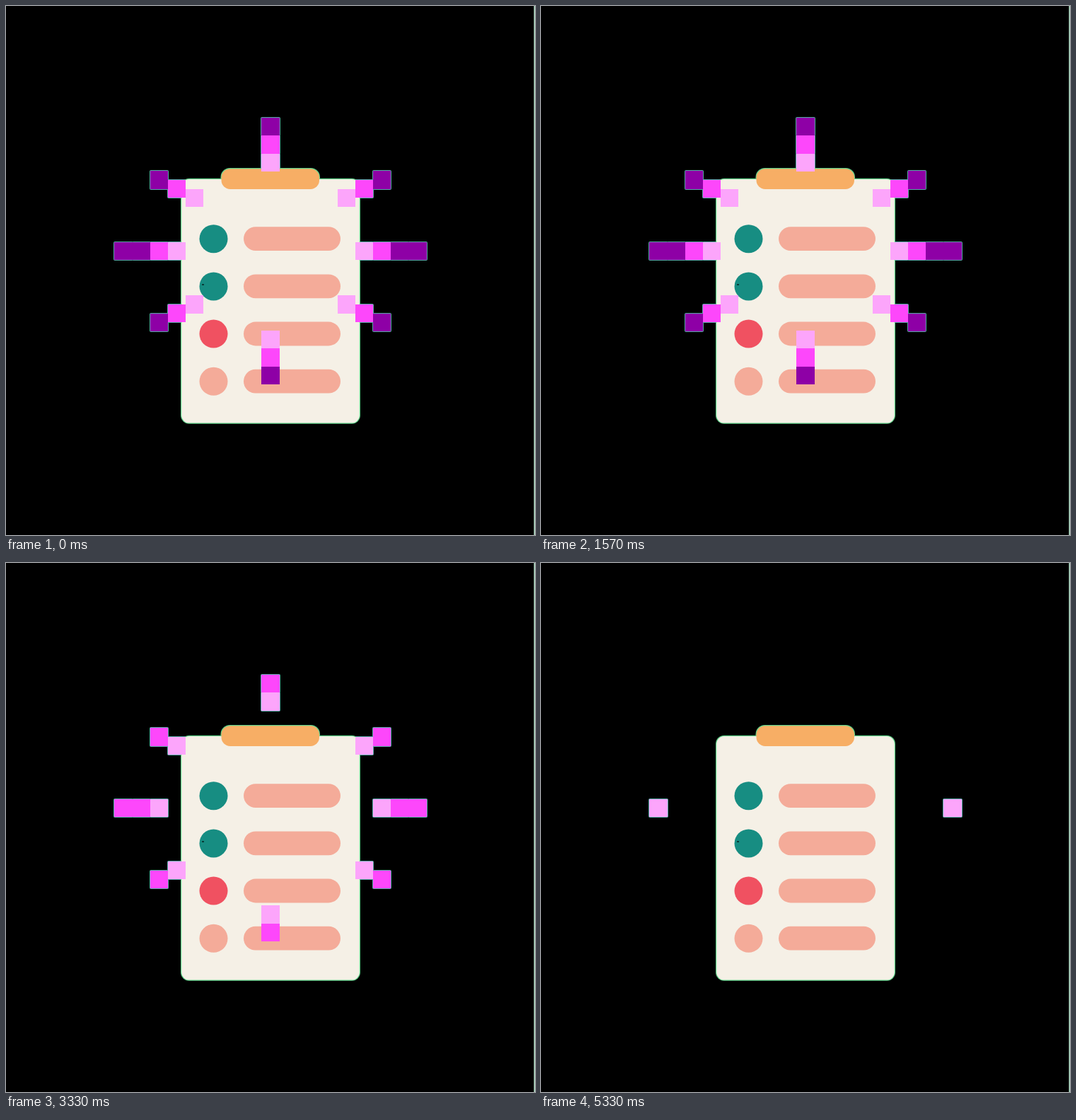
Recreate the animation shown at these times as an HTML page with a canvas. Size 748 px wide and 748 px high, loop 5360 ms.

```html
<!DOCTYPE html>
<html lang="en">
<head>
<meta charset="utf-8">
<title>Checklist burst</title>
<style>
  html, body { margin: 0; width: 100%; height: 100%; overflow: hidden; background: #000; }
  canvas { display: block; width: 748px; height: 748px; }
</style>
</head>
<body>
<canvas id="stage" width="748" height="748"></canvas>
<script>
const ctx = document.getElementById('stage').getContext('2d');

const LOOP = 5360;
const BURSTS = 7;
const CX = 374, CY = 346.5, CELL = 25.2;
const PURPLE = '#8e00a6', PINK = '#fd47fb', PALE = '#fca5fb';
const MINT = '#62d48c', RIM = '#55aaa4';

// Colours of each ray from the tip inwards, for the three stages of a burst.
const STAGES = [
  { side: [PURPLE, PURPLE, PINK, PALE], short: [PURPLE, PINK, PALE] },
  { side: [PINK, PINK, PALE], short: [PINK, PALE] },
  { side: [PALE], short: [] }
];

// Tip offset from the centre and inward step, in pixels.
const RAYS = [];
for (const s of [-1, 1]) {
  RAYS.push({ kind: 'side', x: s * 208, y: 0, dx: -s * CELL, dy: 0 });
  RAYS.push({ kind: 'short', x: 0, y: s * 175.7, dx: 0, dy: -s * CELL });
  for (const v of [-1, 1]) {
    RAYS.push({ kind: 'short', x: s * 157.8, y: v * 100.6, dx: -s * CELL, dy: -v * CELL / 2 });
  }
}

function pill(x, y, w, h, r, color) {
  ctx.fillStyle = color;
  ctx.beginPath();
  ctx.roundRect(x, y, w, h, r);
  ctx.fill();
}

function disc(x, y, r, color) {
  ctx.fillStyle = color;
  ctx.beginPath();
  ctx.arc(x, y, r, 0, Math.PI * 2);
  ctx.fill();
}

function eachCell(stage, paint) {
  for (const ray of RAYS) {
    stage[ray.kind].forEach((color, i) => {
      const left = CX + ray.x + ray.dx * i - CELL / 2;
      const top = CY + ray.y + ray.dy * i - CELL / 2;
      const x = Math.round(left), y = Math.round(top);
      paint(x, y, Math.round(left + CELL) - x, Math.round(top + CELL) - y, color);
    });
  }
}

function drawBoard() {
  pill(303.5, 229, 140.5, 30, 13, MINT);
  pill(247, 243.8, 254, 347, 12, MINT);
  pill(248.2, 245, 251.6, 344.6, 11, '#f5f0e6');
  pill(304.5, 230.2, 138.5, 28.8, 12.5, '#f7ae65');
  ['#178d82', '#178d82', '#f05161', '#f4ab99'].forEach((color, i) => {
    const y = 329.2 + i * 67.2;
    disc(293.5, y, 20, color);
    pill(336, y - 17, 137, 33.8, 16.9, '#f4ab99');
  });
  ctx.fillStyle = '#083c38';
  ctx.fillRect(277, 393, 3, 2);
}

function draw(t) {
  const phase = (t % LOOP) * BURSTS / LOOP % 1;
  const stage = STAGES[Math.floor(phase * STAGES.length)];
  ctx.fillStyle = '#000';
  ctx.fillRect(0, 0, 748, 748);
  ctx.fillStyle = '#b9e6cf';
  ctx.fillRect(746.5, 0, 1.5, 748);
  eachCell(stage, (x, y, w, h) => pill(x - 1, y - 1, w + 2, h + 2, 2, RIM));
  drawBoard();
  eachCell(stage, (x, y, w, h, color) => {
    ctx.fillStyle = color;
    ctx.fillRect(x, y, w, h);
  });
}

const start = performance.now();
function tick() {
  draw(performance.now() - start);
  requestAnimationFrame(tick);
}
tick();
</script>
</body>
</html>
```
